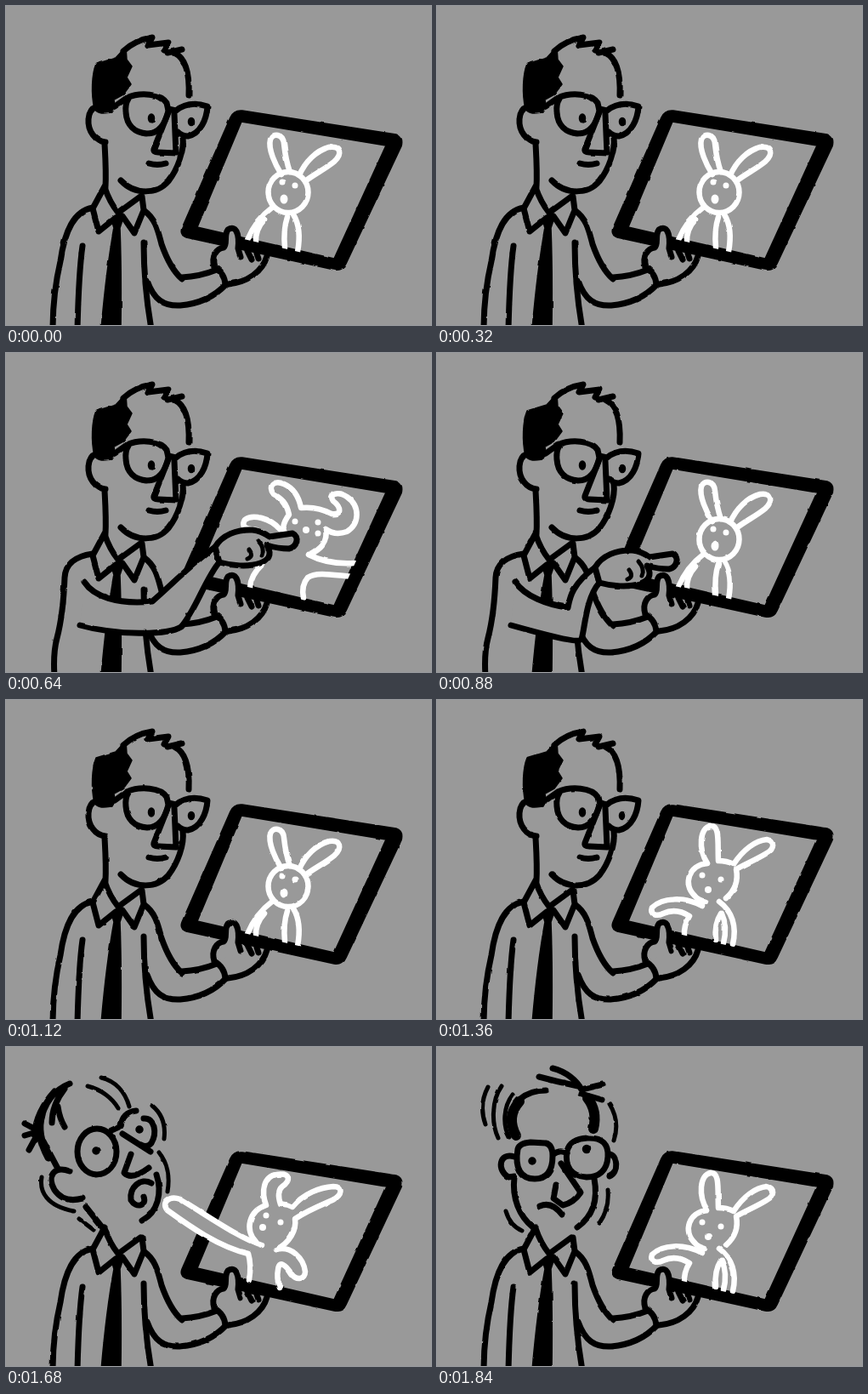
Animation of 500 by 375 pixels, one loop 1.92 s. Source, as an HTML page:

```html
<!DOCTYPE html>
<html lang="en">
<head>
<meta charset="utf-8">
<style>
html, body { margin: 0; width: 100%; height: 100%; overflow: hidden; background: #999; }
svg { display: block; width: 100vw; height: 100vh; }
#art { fill: none; stroke: #000; stroke-width: 7; stroke-linecap: round; stroke-linejoin: round; }
.solid { fill: #000; stroke-width: 1.5; }
.paper { fill: #999; }
.thin { stroke-width: 5; }
.thick { stroke-width: 12; }
.white { stroke: #fff; stroke-width: 6.5; }
.white .dot { fill: #fff; stroke: none; }
</style>
</head>
<body>
<svg viewBox="0 0 500 375">
<defs>
  <filter id="rough" filterUnits="userSpaceOnUse" x="-10" y="-10" width="520" height="410" color-interpolation-filters="sRGB">
    <feTurbulence id="noise" type="fractalNoise" baseFrequency=".07" numOctaves="2" seed="1" result="grain"/>
    <feDisplacementMap in="SourceGraphic" in2="grain" scale="2.2" xChannelSelector="R" yChannelSelector="G"/>
  </filter>
  <clipPath id="screen"><path d="M276 136L449 163 387 299 224 261Z"/></clipPath>
</defs>
<rect width="500" height="375" fill="#999"/>
<g id="art" filter="url(#rough)">

  <g id="body">
    <path d="M116 212L102 238 109 265 129 249M116 213Q122 231 132 243L158 224M160 224L162 240 151 267 137 247"/>
    <path class="solid" d="M124 251L132 244 138 249 134 261Q136 310 135 380H112Q118 310 127 261Z"/>
    <path id="sideResting" d="M102 237C80 241 69 264 64 300C57 330 55 352 55 380M90 282C86 310 85 340 84 380"/>
    <path id="sideRaised" d="M102 236C82 239 70 247 69 264C68 290 66 312 60 335C56 350 56 365 57 380"/>
    <path d="M163 241C176 250 179 265 183 280C190 300 198 313 207 321M207 319Q228 318 248 310M162 278C162 310 164 340 171 380"/>
    <path d="M166 323C174 345 185 353 205 352C228 350 246 341 259 327"/>
  </g>

  <g id="headCalm">
    <path class="solid" d="M141 48L129 61 106 68C101 80 100 103 104 121C109 128 117 126 125 125L128 118 127 110 138 104 147 92 142 84 148 71 142 63Z"/>
    <path d="M138 53Q152 40 172 37L167 46L191 43L186 52M190 55L207 51M198 55C213 62 216 82 215 105"/>
    <path d="M124 121C112 114 98 117 97 133C96 147 105 159 117 160M116 162C117 180 118 195 117 213"/>
    <path d="M128 118L142 108C158 101 182 103 189 114L191 123C187 141 178 150 166 150C151 149 142 140 141 125Q140 115 144 109"/>
    <path d="M191 121L200 123C211 114 225 114 237 118C236 133 229 150 214 153Q207 153 202 148M191 125L174 168Q173 172 179 172L200 173 198 127"/>
    <path d="M168 185Q178 188 188 185M208 154C210 170 202 192 191 206C178 221 152 223 135 205"/>
    <g class="solid"><ellipse cx="171" cy="132" rx="3.5" ry="5"/><ellipse cx="218" cy="136" rx="3.5" ry="4.5"/></g>
  </g>

  <g id="headHit">
    <path class="thick" d="M42 80Q35 102 50 130" style="stroke-width:9"/>
    <path d="M75 43C57 50 45 65 40 90M57 52Q36 75 33 103M22 90L39 99 22 104M39 99L27 121M44 111L61 143M69 49Q54 68 54 89M61 70Q63 84 69 94"/>
    <ellipse cx="107" cy="123" rx="23" ry="27"/>
    <path d="M124 98L135 93Q137 77 153 75M162 84C175 83 178 101 171 113Q166 119 159 115M137 102L170 123M147 126L139 148Q148 157 168 142"/>
    <path d="M171 160C158 153 145 165 147 180C153 190 166 187 162 176M177 150C184 171 179 194 160 204"/>
    <path d="M75 146C56 139 48 152 57 168Q68 184 90 178M94 188L118 218"/>
    <path class="thin" d="M42 153C39 170 48 187 80 193M86 202L103 215M112 36C128 40 140 52 145 70M96 46C112 50 125 60 132 72M172 69C183 78 188 92 186 108M180 124C190 136 193 153 190 170"/>
    <g class="solid"><circle cx="106" cy="122" r="4"/><circle cx="157" cy="97" r="4"/></g>
  </g>

  <g id="headDazed">
    <path class="thick" d="M97 64Q81 82 93 104M177 60Q189 75 184 96"/>
    <path d="M98 61Q110 51 128 51M120 35Q142 41 166 46M136 25C152 29 164 39 170 50L195 44M170 55L194 62"/>
    <path d="M95 120Q97 113 110 112L128 113Q136 115 136 128C136 146 129 155 115 155C99 155 91 143 95 120"/>
    <path d="M153 122Q157 108 177 107C195 106 202 115 201 129C200 146 190 153 176 153C158 152 150 141 153 122"/>
    <path d="M137 126Q145 120 153 125M91 129C73 123 70 145 84 153L91 152M202 126C213 126 214 148 203 152"/>
    <path d="M146 137L169 171Q161 183 148 186L137 178 140 162M121 187Q135 181 147 197"/>
    <path d="M91 153C88 178 97 199 113 212M185 155C190 181 182 200 165 212"/>
    <path class="thin" d="M60 47C52 62 52 77 57 91M76 46C64 63 64 90 72 107M89 56C78 70 77 92 85 106M203 67C211 80 213 95 208 110M81 193Q86 210 100 216M201 168Q203 190 191 207"/>
    <g class="solid"><circle cx="112" cy="134" r="4"/><circle cx="176" cy="120" r="4.5"/></g>
  </g>

  <path class="solid" fill-rule="evenodd" d="M278 123L459 151Q468 154 465 165L400 303Q396 312 386 310L212 272Q204 269 207 261L264 131Q268 122 278 123ZM277 136L225 260 386 297 447 164Z"/>

  <g class="white" clip-path="url(#screen)">
    <g id="bunnyStill">
      <ellipse cx="332" cy="219" rx="23.5" ry="24"/>
      <path d="M324 198C317 187 308 168 311 157C314 149 326 150 327 162Q329 181 334 195M345 199C352 183 365 170 380 166C394 164 396 174 386 183C375 192 362 198 352 206"/>
      <path d="M313 237Q294 251 284 275M304 251Q293 263 294 278M331 248Q326 263 328 284M338 245C346 258 346 273 343 289"/>
      <g class="dot"><circle cx="325" cy="207" r="3.5"/><circle cx="340" cy="211" r="3.5"/><ellipse cx="327" cy="227" rx="4.5" ry="5.5"/></g>
    </g>
    <g id="bunnyPoked">
      <path d="M328 211Q323 204 333 190C330 176 324 171 315 166C307 156 316 149 327 154Q343 161 347 182Q366 180 383 189C396 191 394 181 385 174C379 166 390 162 401 169C417 180 416 201 401 210Q387 215 376 207C379 223 370 231 357 237"/>
      <path d="M322 207C311 194 290 189 281 196C275 206 286 207 295 208L304 215M356 237Q379 249 410 247M410 263C390 262 366 256 355 264Q347 273 350 288M301 249Q288 261 287 276"/>
      <g class="dot"><circle cx="340" cy="198" r="3.5"/><circle cx="353" cy="208" r="4"/><circle cx="367" cy="212" r="3.5"/><circle cx="367" cy="199" r="3.5"/></g>
    </g>
    <g id="bunnyReady">
      <path d="M318 192C307 175 309 150 322 148C333 147 330 168 331 189Q341 189 349 193C360 176 375 165 388 164C398 166 397 175 388 180C375 188 362 193 352 199Q356 219 340 233M318 192C296 194 289 217 303 230Q307 235 315 237"/>
      <path d="M312 242C290 231 265 232 253 244C250 252 258 255 266 251Q281 244 297 254Q290 265 291 278M332 237C347 248 353 266 348 287M334 251Q326 263 328 282M335 251Q342 266 337 286"/>
      <g class="dot"><circle cx="312" cy="206" r="3.5"/><circle cx="334" cy="211" r="3.5"/><circle cx="319" cy="223" r="4"/></g>
    </g>
  </g>
  <g id="bunnyHit" class="white">
    <path d="M306 186C300 170 303 152 318 150C334 147 336 157 325 164Q318 170 323 185Q330 184 337 188C350 172 370 165 385 164C397 164 396 174 384 180C368 187 355 192 340 202C342 215 334 230 318 238M306 186C285 193 281 215 294 229"/>
    <path class="paper" d="M301 233C275 225 240 200 205 179C192 174 182 183 190 192C215 210 250 235 285 243Q289 256 286 274"/>
    <path d="M318 238C335 233 350 248 352 264C352 273 342 275 336 267C329 256 321 250 320 262Q318 271 322 283"/>
    <g class="dot"><circle cx="306" cy="198" r="3.5"/><circle cx="323" cy="206" r="3.5"/><circle cx="302" cy="212" r="4"/></g>
  </g>

  <g id="holdingHand">
    <path class="paper" d="M245 307C241 294 248 285 256 284C261 280 256 270 261 263C270 257 275 267 273 285L267 300" stroke="none"/>
    <path d="M245 307C241 294 248 285 256 284C261 280 256 270 261 263C270 257 275 267 273 285L276 295M284 288L289 298M295 291L297 297M307 294C302 312 284 325 261 327M245 307Q257 314 258 327"/>
  </g>

  <g id="pokingArm">
    <path id="sleeve" class="paper"/>
    <g id="pokingHand">
      <path class="paper" d="M246 228C254 214 272 207 290 208Q300 209 310 216Q323 214 337 212C346 216 342 228 333 230Q320 230 307 226C314 238 308 244 299 247C285 252 265 250 251 246Z"/>
      <path d="M297 221Q305 230 301 238M286 231Q292 239 284 242" class="thin"/>
    </g>
  </g>
</g>
</svg>
<script>
const STEP = 80, LOOP = 1920;
const $ = id => document.getElementById(id);
const heads = ['headCalm', 'headHit', 'headDazed'];
const bunnies = ['bunnyStill', 'bunnyPoked', 'bunnyReady', 'bunnyHit'];
const sides = ['sideResting', 'sideRaised'];
const SEEDS = [3, 8, 14, 21];

// [start ms, head, bunny, poking hand distance or null, head dx, head dy]
const poses = [
  [0, 'headCalm', 'bunnyStill', null],
  [480, 'headCalm', 'bunnyStill', 75],
  [560, 'headCalm', 'bunnyStill', 25],
  [640, 'headCalm', 'bunnyPoked', 0],
  [800, 'headCalm', 'bunnyPoked', 8],
  [880, 'headCalm', 'bunnyStill', 60],
  [960, 'headCalm', 'bunnyStill', null],
  [1280, 'headCalm', 'bunnyReady', null],
  [1600, 'headHit', 'bunnyHit', null, 3, -6],
  [1680, 'headHit', 'bunnyHit', null],
  [1760, 'headDazed', 'bunnyReady', null, -3, 1],
  [1840, 'headDazed', 'bunnyReady', null]
];

function showOnly(ids, chosen) {
  for (const id of ids) $(id).style.display = id === chosen ? '' : 'none';
}

function drawArm(back) {
  const hidden = back === null;
  $('pokingArm').style.display = hidden ? 'none' : '';
  showOnly(sides, hidden ? 'sideResting' : 'sideRaised');
  if (hidden) return;
  const dx = -back, dy = back * .4;
  const at = (x, y, k = 1) => `${x + dx * k} ${y + dy * k}`;
  $('pokingHand').setAttribute('transform', `translate(${dx} ${dy})`);
  $('sleeve').setAttribute('d',
    `M92 269C103 286 130 296 ${at(172, 292, .3)}C${at(192, 275, .6)} ${at(218, 248)} ${at(246, 228)}` +
    `L${at(251, 246)}C${at(235, 264)} ${at(222, 305, .8)} ${at(206, 322, .6)}C${at(190, 332, .4)} 130 332 87 320`);
}

let shown = -1;
function draw(time) {
  const step = Math.floor(time % LOOP / STEP);
  if (step === shown) return;
  shown = step;
  const [, head, bunny, arm, dx = 0, dy = 0] = poses.findLast(p => p[0] <= step * STEP);
  showOnly(heads, head);
  showOnly(bunnies, bunny);
  $(head).setAttribute('transform', `translate(${dx} ${dy})`);
  drawArm(arm);
  $('noise').setAttribute('seed', SEEDS[step % SEEDS.length]);
}

const start = performance.now();
function tick() {
  draw(performance.now() - start);
  requestAnimationFrame(tick);
}
tick();
</script>
</body>
</html>
```
